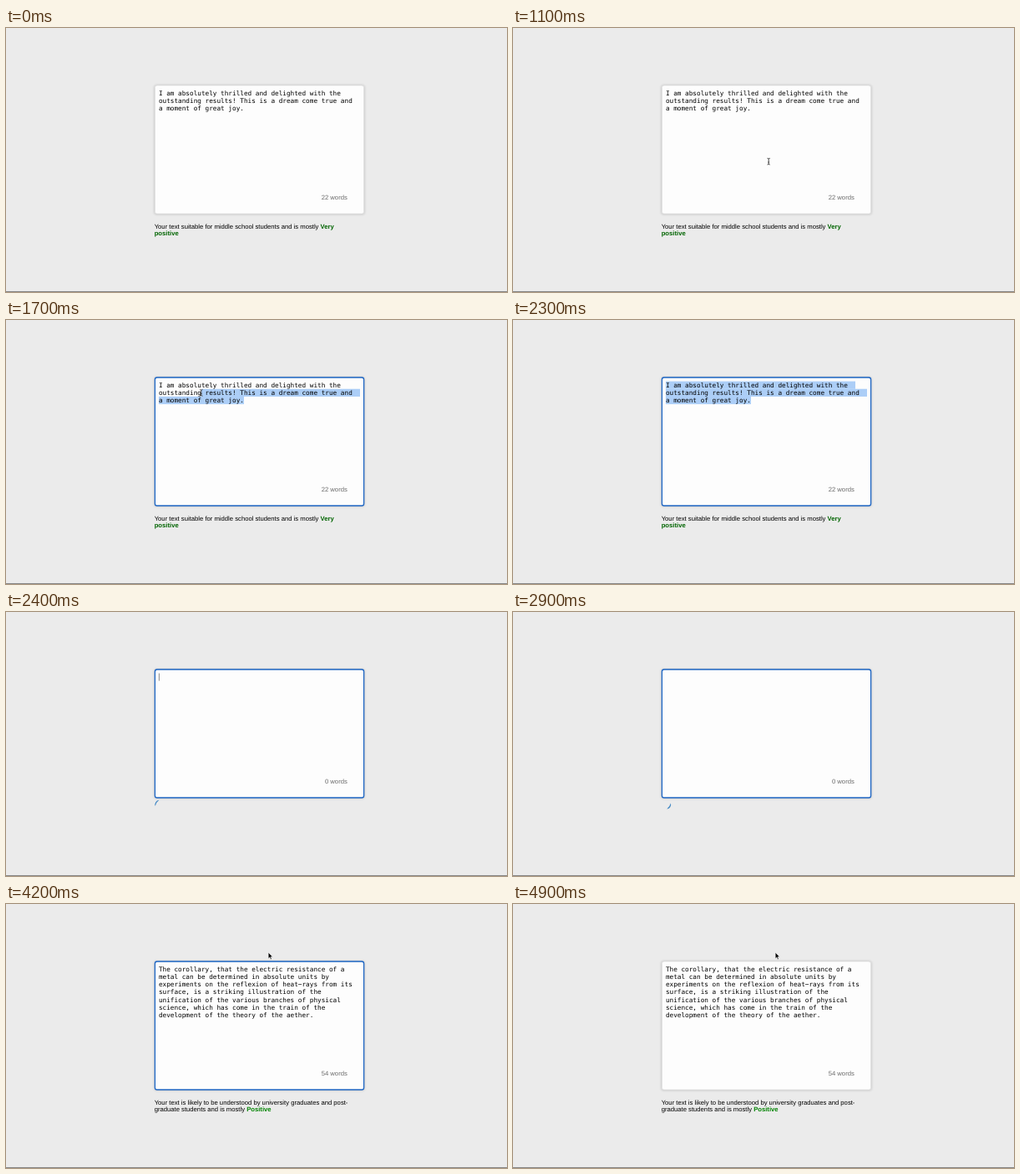
Recreate the animation shown at these times as an HTML page. Size 600x317 px, loop 5000 ms.

```html
<!DOCTYPE html>
<html lang="en">
<head>
<meta charset="utf-8">
<title>Readability and sentiment checker</title>
<style>
  html, body { margin: 0; width: 100%; height: 100%; overflow: hidden; background: #ebebeb; }
  svg { display: block; width: 100vw; height: 100vh; }
  text { white-space: pre; text-rendering: geometricPrecision; }
  .mono { font: 7.71px "DejaVu Sans Mono", monospace; }
  .sans { font: 7.68px "Liberation Sans", Arial, sans-serif; }
  .mood { font-weight: bold; }
</style>
</head>
<body>
<svg viewBox="0 0 600 317" xmlns="http://www.w3.org/2000/svg">
  <defs>
    <filter id="soft" x="-5%" y="-5%" width="110%" height="112%"><feGaussianBlur stdDeviation="1.6"/></filter>
  </defs>
  <rect width="600" height="317" fill="#ebebeb"/>
  <rect y="316" width="600" height="1" fill="#868686"/>
  <rect x="177.5" y="68.5" width="252" height="155.5" rx="3" fill="#000" opacity=".16" filter="url(#soft)"/>
  <rect id="box" x="178.4" y="69" width="250.2" height="154" rx="2.6" fill="#fdfdfd" stroke-width="1.3"/>
  <g id="marks" fill="#accef7"></g>
  <g id="lines" class="mono"></g>
  <rect id="caret" width=".8" height="9" fill="#222"/>
  <text id="count" class="sans" x="408.8" y="206.4" text-anchor="end" fill="#6c6c6c"></text>
  <g id="report" class="sans"></g>
  <path id="spin" d="M3.3-4.26A5.4 5.4 0 0 1 3.3 4.26A13.3 13.3 0 0 0 3.3-4.26Z" fill="#4389c4"/>
  <path id="arrow" d="M0 0V7.2L1.7 5.7L2.8 8.2L4 7.7L2.9 5.2H5.1Z" fill="#000" stroke="#fff" stroke-width=".5"/>
  <path id="beam" d="M-1.6-3.8Q0-3.8 0-2.8Q0-3.8 1.6-3.8M0-2.8V2.8M-1.6 3.8Q0 3.8 0 2.8Q0 3.8 1.6 3.8M-.9 .9H.9" fill="none" stroke="#222" stroke-width=".8"/>
</svg>
<script>
const LOOP = 5000, STEP = 100;
const LEFT = 182.9, TOP = 73.6, ROW = 9.13, CHAR = 4.642;

const JOY = [
  "I am absolutely thrilled and delighted with the",
  "outstanding results! This is a dream come true and",
  "a moment of great joy."
];
const SCIENCE = [
  "The corollary, that the electric resistance of a",
  "metal can be determined in absolute units by",
  "experiments on the reflexion of heat\u2212rays from its",
  "surface, is a striking illustration of the",
  "unification of the various branches of physical",
  "science, which has come in the train of the",
  "development of the theory of the aether."
];
const MARK_ENDS = [410, 424, 285];

const HAPPY = `<text x="177.7" y="240.5">Your text suitable for middle school students and is mostly <tspan class="mood" fill="#006400">Very</tspan></text>
  <text x="177.7" y="249.4" class="mood" fill="#006400">positive</text>`;
const LEARNED = `<text x="177.7" y="240.5">Your text is likely to be understood by university graduates and post-</text>
  <text x="177.7" y="249.4">graduate students and is mostly <tspan class="mood" fill="#048404">Positive</tspan></text>`;

const CLEAR = 2400, PASTE = 3200, ANSWER = 3800;

const $ = id => document.getElementById(id);
const clamp = x => Math.max(0, Math.min(1, x));
const span = (t, a, b) => clamp((t - a) / (b - a));
const ease = x => x * x * (3 - 2 * x);
const mix = (a, b, k) => a + (b - a) * k;
const show = (id, on) => $(id).setAttribute("display", on ? "inline" : "none");
const move = (id, x, y, turn = 0) =>
  $(id).setAttribute("transform", `translate(${x} ${y}) rotate(${turn})`);

function fill(id, html) {
  const el = $(id);
  if (el.shown !== html) { el.innerHTML = html; el.shown = html; }
}

const rows = list => list.map((s, i) =>
  `<text x="${LEFT}" y="${TOP + 7.4 + i * ROW}">${s}</text>`).join("");

function pointer(t) {
  if (t < 1000 || (t >= 2300 && t < 3500)) return null;
  if (t < 1600) {
    const k = 1 - (1 - span(t, 1000, 1300)) ** 2;
    const y = mix(241, 95.6, k);
    return { x: mix(318, 296.7, k), y, beam: y < 223 };
  }
  if (t < 2300) {
    const k = ease(span(t, 1500, 2000));
    return { x: mix(296.7, 118, k), y: mix(95.6, 72.3, k), beam: true };
  }
  const k = ease(span(t, 3400, 4000));
  return { x: mix(118, 314.2, k), y: mix(70, 58.2, 1 - (1 - k) ** 2), beam: false };
}

// Highlight from the pointer's character to the end of the text.
function selection(t) {
  if (t < 1600 || t >= CLEAR) return "";
  const p = pointer(Math.min(t, 2200));
  const first = Math.max(0, Math.floor((p.y - TOP) / ROW));
  const col = p.y < TOP ? 0 : Math.max(0, Math.round((p.x - LEFT) / CHAR));
  return MARK_ENDS.map((end, i) => {
    const x = LEFT + (i === first ? col * CHAR : 0);
    return i < first || x >= end ? "" :
      `<rect x="${x}" y="${TOP + i * ROW}" width="${end - x}" height="${ROW + .1}"/>`;
  }).join("");
}

function caret(t) {
  if (t >= 1400 && t < 1600) return [285.2, 2, .65];
  if (t >= CLEAR && t < 2900) return [LEFT, 0, .65];
  if (t >= PASTE && t < 4200) return [368.3, 6, t < 4100 ? .65 : .3];
  return null;
}

function draw(t) {
  const focus = span(t, 1200, 1500) - span(t, 4600, 4900);
  const tint = [[222, 28], [222, 101], [222, 196]].map(([a, b]) => Math.round(mix(a, b, focus)));
  $("box").setAttribute("stroke", `rgb(${tint})`);
  $("box").setAttribute("stroke-width", mix(.7, 1.3, focus));

  fill("lines", t < CLEAR ? rows(JOY) : t < PASTE ? "" : rows(SCIENCE));
  fill("count", (t < CLEAR ? 22 : t < PASTE ? 0 : 54) + " words");
  fill("report", t < CLEAR ? HAPPY : t < ANSWER ? "" : LEARNED);
  fill("marks", selection(t));

  const c = caret(t);
  show("caret", c);
  if (c) {
    $("caret").setAttribute("x", c[0]);
    $("caret").setAttribute("y", TOP + c[1] * ROW);
    $("caret").setAttribute("opacity", c[2]);
  }

  // One turn per second, restarted by the paste.
  show("spin", t >= CLEAR && t < ANSWER);
  move("spin", 183.8, 231.2, t < PASTE ? 33 + .36 * (t - 2900) : 108 + .36 * (t - 3400));

  const p = pointer(t);
  show("arrow", p && !p.beam);
  show("beam", p && p.beam);
  if (p) move(p.beam ? "beam" : "arrow", p.x, p.y);
}

const start = performance.now();
function tick() {
  const t = (performance.now() - start) % LOOP;
  draw(Math.floor(t / STEP) * STEP);
  requestAnimationFrame(tick);
}
tick();
</script>
</body>
</html>
```
